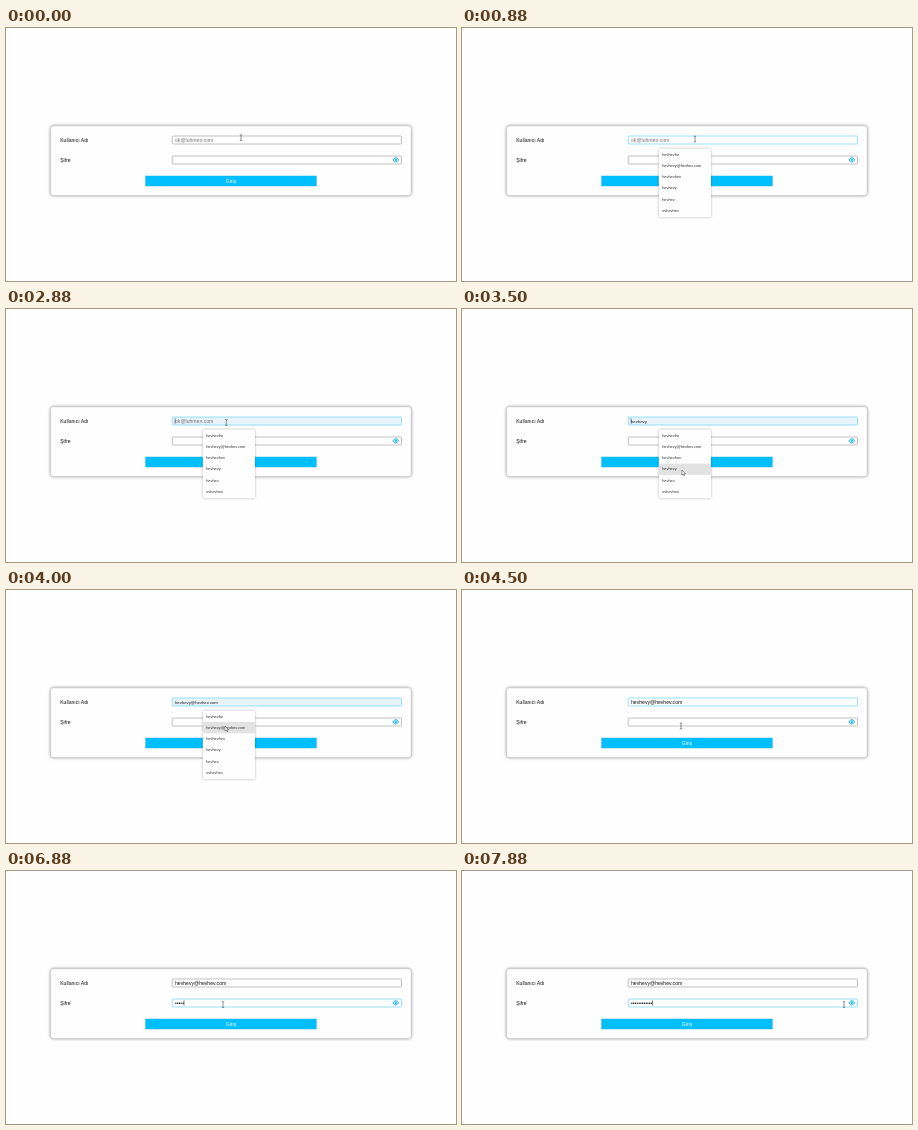
Write an HTML page that moves like this. It is 450 px wide and 253 px high and loops after 8 s.

```html
<!DOCTYPE html>
<html lang="tr">
<head>
<meta charset="utf-8">
<title>Giriş</title>
<style>
  html, body { margin: 0; width: 100%; height: 100%; overflow: hidden; background: #fefefe; }
  svg { display: block; width: 100%; height: 100%; }
  text { font: 5.1px "Liberation Sans", Arial, sans-serif; fill: #111; white-space: pre; }
  .card { fill: #fefefe; stroke: #bcbcbc; stroke-width: .5; filter: drop-shadow(0 0 1.4px rgba(0, 0, 0, .42)); }
  .field { fill: #fefefe; stroke: #999; stroke-width: .6; }
  .field.focus { stroke: #5ccdf5; }
  .field.tint { fill: #e6f3fb; }
  .button { fill: #00bfff; stroke: #1fb0e8; stroke-width: .5; }
  .menu { fill: #fefefe; filter: drop-shadow(0 .3px .9px rgba(0, 0, 0, .32)); }
  #items text { font-size: 3.9px; fill: #2a2a2a; }
  #hover { fill: #e2e2e2; }
  #beam { fill: none; stroke: #222; stroke-width: .5; }
  #arrow { fill: #fff; stroke: #222; stroke-width: .45; stroke-linejoin: round; }
</style>
</head>
<body>
<svg viewBox="0 0 450 253" preserveAspectRatio="none">
  <rect class="card" x="44.6" y="97.8" width="360.6" height="69.8" rx="3"/>
  <text x="54.2" y="113.6">Kullanıcı Adı</text>
  <text x="54.2" y="133.6">Şifre</text>
  <rect id="user" class="field" x="166.2" y="108" width="229.3" height="8" rx="1"/>
  <rect id="pass" class="field" x="166.2" y="128" width="229.3" height="8" rx="1"/>
  <text id="userText" x="169" y="113.6"></text>
  <text id="passText" x="169" y="133.5"></text>
  <path id="caret" stroke="#111" stroke-width=".5"/>
  <g fill="none" stroke="#16b4ee">
    <path d="M387 131.8Q389.8 127.4 392.6 131.8Q389.8 136.2 387 131.8Z" stroke-width="1"/>
    <circle cx="389.8" cy="131.8" r="1" fill="#16b4ee" stroke-width=".4"/>
  </g>
  <rect class="button" x="139.7" y="148" width="170.6" height="10"/>
  <text x="225" y="154.6" text-anchor="middle" style="fill:#fff">Giriş</text>
  <g id="menu">
    <rect class="menu" x="196.8" y="120.4" width="52.2" height="68.8" rx=".6"/>
    <rect id="hover" x="196.8" width="52.2" height="11.3"/>
    <g id="items"></g>
  </g>
  <path id="beam" d="M-1.2-3Q0-3 0-2.4Q0-3 1.2-3M0-2.4V2.4M-1.2 3Q0 3 0 2.4Q0 3 1.2 3"/>
  <path id="arrow" d="M0 0V5L1.2 4L2 5.8L2.8 5.4L2 3.7H3.6Z"/>
</svg>
<script>
const LOOP = 8000, STEP = 125, BLINK = 510;
const USER_FOCUS = 365, MENU_OPEN = 500, PICK = 4250, PASS_FOCUS = 4990, TYPE_START = 6500, TYPE_TIME = 1000;
const ROW = 11.3, TOP = 120.7, LETTERS = 12;
const HINT = "ok@luhmen.com", MAIL = "hevhevy@hevhev.com";
const ITEMS = ["hevhevhe", MAIL, "hevhevhev", "hevhevy", "hevhev", "evhevhev"];

// Mouse moves; the pointer rests between them.
const HOME = { x: 235, y: 109.7 };
const MOVES = [
  { from: 0, to: 125, x: 233, y: 111 },
  { from: 1375, to: 1750, x: 226, y: 161 },
  { from: 1750, to: 2000, x: 222, y: 133.2 },
  { from: 2625, to: 2875, x: 220.3, y: 113.5 },
  { from: 2875, to: 3125, x: 220, y: 164 },
  { from: 3375, to: 4000, x: 219, y: 136 },
  { from: 4875, to: 5250, x: 217, y: 133.5 },
  { from: 7375, to: 7875, x: 382, y: 133.5 }
];

const $ = id => document.getElementById(id);
const show = (id, on) => $(id).style.display = on ? "" : "none";
const progress = (t, from, to) => Math.min(1, Math.max(0, (t - from) / (to - from)));
const ease = p => p * p * (3 - 2 * p);

function pointerAt(t) {
  return MOVES.reduce((pos, move) => {
    const p = ease(progress(t, move.from, move.to));
    return { x: pos.x + (move.x - pos.x) * p, y: pos.y + (move.y - pos.y) * p };
  }, HOME);
}

const menuOpen = t => t >= MENU_OPEN && t < PICK;
const hoverRow = t => menuOpen(t) ? Math.floor((pointerAt(t).y - TOP) / ROW) : -1;

ITEMS.forEach((word, i) => {
  const item = document.createElementNS("http://www.w3.org/2000/svg", "text");
  item.setAttribute("x", 200.2);
  item.setAttribute("y", TOP + i * ROW + 6.8);
  item.textContent = word;
  $("items").append(item);
});

function draw(t) {
  const { x, y } = pointerAt(t);
  const row = hoverRow(t), preview = row >= 0, picked = t >= PICK;
  const onPass = t >= PASS_FOCUS, onUser = t >= USER_FOCUS && !onPass;
  const count = Math.round(LETTERS * progress(t, TYPE_START, TYPE_START + TYPE_TIME));

  $("user").classList.toggle("focus", onUser);
  // The tint fades one step after the preview ends.
  $("user").classList.toggle("tint", preview || hoverRow(t - STEP) >= 0 && !picked);
  $("pass").classList.toggle("focus", onPass);

  const label = $("userText");
  label.textContent = picked ? MAIL : preview ? ITEMS[row] : HINT;
  label.style.fill = picked || preview ? "#111" : "#757575";
  label.style.fontSize = preview ? "4.25px" : "5.1px";
  $("passText").textContent = "•".repeat(count);

  const sinceFocus = t - (onPass ? PASS_FOCUS : USER_FOCUS);
  const lit = Math.floor(sinceFocus / BLINK) % 2 === 0;
  show("caret", count > 0 || (onUser || onPass) && lit && !picked || onPass && lit);
  $("caret").setAttribute("d", `M${169.1 + count * 1.785} ${onPass ? 129.3 : 109.3}v5.3`);

  show("menu", menuOpen(t));
  show("hover", preview);
  $("hover").setAttribute("y", TOP + Math.max(row, 0) * ROW);

  show("arrow", preview);
  show("beam", !preview);
  for (const id of ["arrow", "beam"]) $(id).setAttribute("transform", `translate(${x} ${y})`);
}

const start = performance.now();
function tick() {
  const t = (performance.now() - start) % LOOP;
  draw(Math.floor(t / STEP) * STEP);
  requestAnimationFrame(tick);
}
tick();
</script>
</body>
</html>
```
